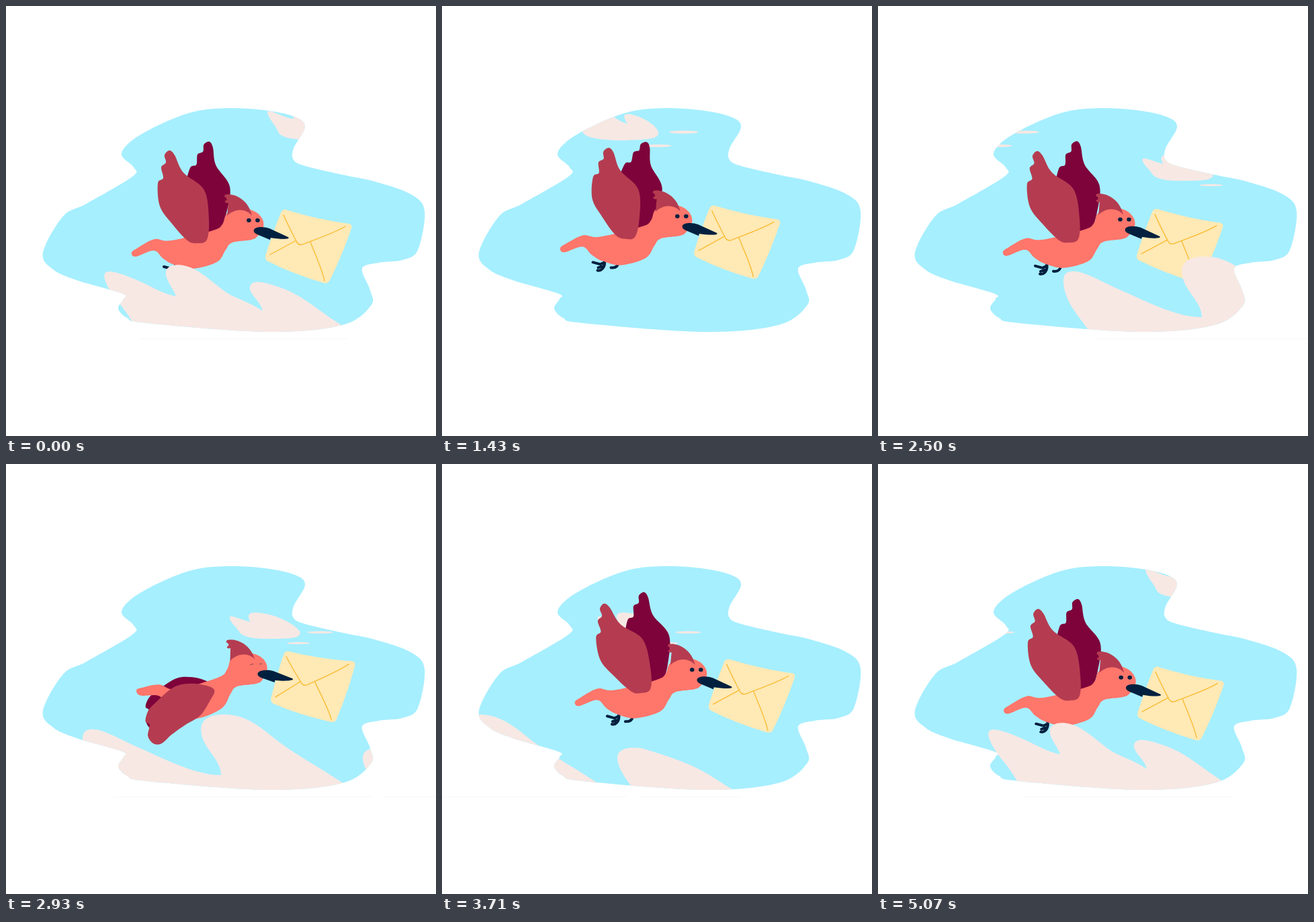
These frames come from a looping animation (640 px wide and 640 px high, 5.14 s). An HTML page:

```html
<!DOCTYPE html>
<html lang="en">
<head>
<meta charset="utf-8">
<title>Bird with a letter</title>
<style>
  html, body { margin: 0; width: 100%; height: 100%; overflow: hidden; background: #fff; }
  svg { display: block; width: 100vw; height: 100vh; }
  .cloud { fill: #f7e8e4; }
  .navy { fill: #01203f; }
  .coral { fill: #ff766b; }
  .near { fill: #b53c50; }
  .far { fill: #7e033b; }
  .line { fill: none; stroke-linecap: round; stroke-linejoin: round; }
</style>
</head>
<body>
<svg viewBox="0 0 640 640">
  <defs>
    <clipPath id="clip"><path class="blob"/></clipPath>
    <g id="skyA" class="cloud">
      <path d="M281 157C288 154 302 166 321 168C312 154 314 150 322 151C338 156 346 172 364 175C354 163 360 158 372 162C392 167 408 180 410 188C411 198 396 199 350 200C320 199 300 196 297 187C293 177 281 166 281 157Z"/>
      <ellipse cx="447.5" cy="187.7" rx="21.5" ry="2.3"/>
      <ellipse cx="409" cy="208" rx="20" ry="2"/>
    </g>
    <g id="skyB" class="cloud">
      <path d="M333 229C333 223 345 230 364 235C358 225 362 221 372 221C405 223 432 240 438 250C440 260 420 260 395 260C365 261 350 256 347 249C342 241 334 236 333 229Z"/>
      <ellipse cx="468" cy="250.5" rx="19" ry="1.7"/>
      <ellipse cx="435.5" cy="266.7" rx="17" ry="1.6"/>
    </g>
    <path id="hillA" class="cloud" d="M199 495C191 472 180 456 165 438C152 422 142 402 148 397C154 391 182 402 206 413C226 423 240 430 253 432C250 422 240 412 238 400C236 386 252 383 268 387C290 392 312 417 334 430C355 440 368 444 382 454C380 440 362 430 363 418C365 406 386 411 402 417C440 428 462 452 498 474Q508 481 508 495Z"/>
  </defs>

  <path class="blob" fill="#a6efff"/>
  <g clip-path="url(#clip)">
    <g id="sky">
      <use href="#skyA" x="108"/>
      <use href="#skyB" x="398"/>
      <use href="#skyA" x="799"/>
    </g>
  </g>

  <g id="bird">
    <path id="farWing" class="far"/>
    <path id="legs" class="line" stroke="#01203f" stroke-width="4" d="M251 380Q255 392 249 398Q246 401 242 400M235 388L246 391L252 388M243 396L250 394M273 388Q272 397 262 396"/>
    <path id="body" class="coral"/>
    <path id="nearWing" class="near"/>
    <g id="head">
      <path class="coral" d="M329 316C333 302 352 298 366 304C380 309 387 322 382 332C378 344 365 349 352 349Z"/>
      <path class="near" d="M326 281C334 278 360 284 366 312C358 302 342 300 329 312C330 306 330 300 331 293C328 294 325 292 326 290C330 290 329 285 325 284Z"/>
      <path fill="#ffe9b5" d="M409 308Q412 301 419 304Q465 318 510 324Q516 325 514 331Q500 372 482 408Q479 414 472 412Q425 398 390 380Q384 377 387 369Q398 335 409 308Z"/>
      <path class="line" stroke="#f9bd35" stroke-width="1.4" d="M413 311C419 325 428 342 433 352Q437 358 446 353C470 344 490 337 505 328M393 370L432 349M453 351C460 370 470 390 474 409"/>
      <path class="navy" d="M369 333C371 328 384 328 392 331L420 344C424 347 412 348 394 345L393 348L374 340C370 338 368 336 369 333Z"/>
      <g id="eyes" class="navy">
        <ellipse cx="361.5" cy="319" rx="3.3" ry="3"/>
        <ellipse cx="374.5" cy="319" rx="3.3" ry="3"/>
      </g>
    </g>
  </g>

  <g clip-path="url(#clip)">
    <g class="front">
      <use href="#hillA"/>
      <path class="cloud" transform="translate(1062)" d="M160 495C145 472 130 456 122 440C113 420 111 402 119 397C135 388 165 408 195 421C230 436 282 464 320 463C320 440 295 425 291 402C287 382 300 374 320 373C350 371 372 386 394 404C425 430 465 450 500 474Q530 484 545 495Z"/>
      <path class="cloud" transform="translate(1332)" d="M293 495C275 470 262 455 261 438C260 425 275 420 297 423C320 430 355 440 384 455C405 466 420 478 432 484Q444 490 446 495Z"/>
      <use href="#hillA" x="1836"/>
    </g>
  </g>
  <path class="front" stroke="#fbf6f5" d="M199 495.5H508M1222 495.5H1607M1625 495.5H1778M2035 495.5H2344"/>
</svg>

<script>
const LOOP = 5140, FPS = 14, STEPS = 102, FLAPS = 4, TAU = 2 * Math.PI;
const { sin, cos, min, max, abs, round, floor } = Math;
const $ = s => document.querySelector(s);
const points = s => s.split(' ').map(p => p.split(',').map(Number));
const mix = (a, b, t) => a + (b - a) * t;
const smooth = t => t * t * (3 - 2 * t);

// 0 at phase 0, 1 at phase .5; a larger gain holds both ends longer
const pulse = (phase, gain) => smooth(max(0, min(1, .5 - gain * cos(TAU * phase))));

// Closed smooth curve through the points
function curve(pts) {
  const n = pts.length, at = i => pts[(i + n) % n];
  let d = 'M' + pts[0];
  for (let i = 0; i < n; i++) {
    const [a, b, c, e] = [at(i - 1), at(i), at(i + 1), at(i + 2)];
    const h1 = b.map((v, j) => v + (c[j] - a[j]) / 6);
    const h2 = c.map((v, j) => v - (e[j] - b[j]) / 6);
    d += `C${h1} ${h2} ${c}`;
  }
  return d + 'Z';
}

const blob = points('172,221 189,199 232,175 281,157 330,152 385,155 430,165 445,180 428,212 428,229 445,238 500,251 548,261 602,280 623,305 613,363 590,378 555,382 530,391 542,423 543,446 500,475 390,485 210,472 180,464 167,450 175,436 173,428 105,408 70,392 55,367 85,313 120,294 188,254 190,240');
const torso = points('187,367 196,360 221,347 246,349 308,334 322,325 329,309 350,303 375,320 372,345 337,352 327,363 314,381 278,391 250,385 234,376 220,364 193,373');

// Wing outlines around the shoulder
const wingUp = points('9,6 12,-24 5,-68 -26,-94 -39,-120 -47,-127 -54,-120 -52,-109 -59,-102 -56,-86 -64,-78 -61,-44 -43,-18 -20,7 -5,11');
const wingDown = points('13,-1 9,16 -2,41 -21,58 -39,76 -52,92 -64,94 -74,84 -74,67 -81,63 -80,48 -72,34 -48,5 -24,-5 -2,-6');

const set = (el, name, value) => el.setAttribute(name, value);
const move = (el, x, y = 0, more = '') => set(el, 'transform', `translate(${x} ${y})${more}`);
const [sky, bird, head, eyes, legs, body, nearWing, farWing] =
  ['sky', 'bird', 'head', 'eyes', 'legs', 'body', 'nearWing', 'farWing'].map(id => $('#' + id));
const front = document.querySelectorAll('.front');
document.querySelectorAll('.blob').forEach(el => set(el, 'd', curve(blob)));

// Tail and neck rise around a still belly
const bend = (x, dip) => -dip * min(22 * ((x - 270) / 80) ** 2, x < 270 ? 23 : 11);

function draw(n) {
  move(sky, -6.75 * n);
  front.forEach(el => move(el, -18 * n));

  const a = TAU * n / STEPS;
  move(bird, -10 * sin(a) + 3 * sin(2 * a),
    7.5 * sin(a) - 8 * sin(a) ** 2 + 4.5 * sin(3 * a) - 1.2 * (1 - cos(a)));

  const phase = n * FLAPS / STEPS % 1;
  const dip = pulse(phase, .55), stroke = pulse(phase + .03, .8), swing = sin(TAU * phase);

  const wing = curve(wingUp.map((p, i) => p.map((v, j) => mix(v, wingDown[i][j], stroke))));
  const shoulder = 342 + 6 * swing * stroke;
  set(nearWing, 'd', wing);
  set(farWing, 'd', wing);
  move(nearWing, 290, shoulder, ` rotate(${10 * swing})`);
  move(farWing, mix(310, 290, stroke), shoulder - mix(13, 7, stroke),
    ` rotate(${10 * swing + mix(17, 8, stroke)}) scale(.94)`);

  set(body, 'd', curve(torso.map(([x, y]) => [x, y + bend(x, dip)])));
  move(legs, 10 * dip, -22 * dip);
  move(head, -3 * dip, -11 * dip, ` rotate(${-4.6 * dip} 361 319)`);

  const open = min(1, .08 + .45 * abs(n - 59));
  move(eyes, 0, 319 * (1 - open), ` scale(1 ${open})`);
}

let shown = -1;
function tick() {
  const k = min(71, floor((performance.now() % LOOP + 5) * FPS / 1000));
  const n = round(k * 20 / FPS);
  if (n !== shown) draw(shown = n);
  requestAnimationFrame(tick);
}
tick();
</script>
</body>
</html>
```
